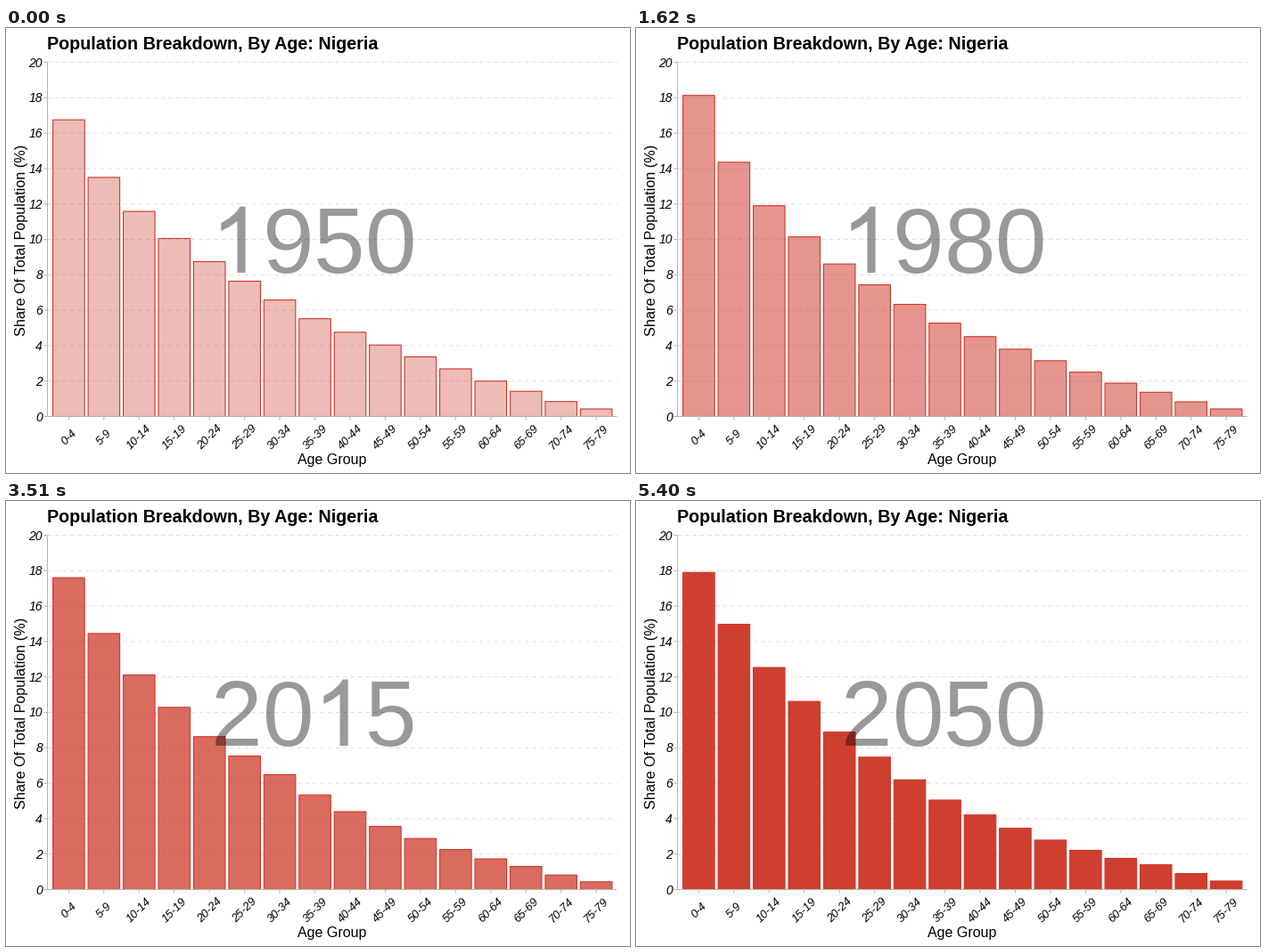
Recreate the animation shown at these times as a matplotlib script. Size 700x500 px, loop 5670 ms.

```python
import numpy as np
import matplotlib.pyplot as plt
from matplotlib.animation import FuncAnimation
from matplotlib.patches import Polygon, Rectangle

W, H, DPI = 700, 500, 100
LEFT, RIGHT, TOP, BASE = 46.5, 685.5, 38.5, 436.5
UNIT = (BASE - TOP) / 20              # pixels per percent
PITCH, FIRST = 39.45, 70.4            # bar spacing, first bar centre
BAR_W = 0.9 * PITCH
STEPS, GROUPS = 21, 16                # five years per step and per group
FILL, EDGE = (0.812, 0.247, 0.188), "#d0362a"
AXIS, GRID = "#b3b3b3", "#dfdfdf"
YEAR_X, YEAR_Y, YEAR_PX = 230, 275, 103.5
# Footless digit one, in em
ONE = [(0.373, 0), (0.285, 0), (0.285, 0.56), (0.20, 0.499), (0.109, 0.454),
       (0.109, 0.539), (0.20, 0.594), (0.275, 0.661), (0.316, 0.719),
       (0.373, 0.719)]


def shares(step):
    """Percent per age group: average profile x birth wave x slow tilts."""
    age = np.arange(GROUPS)
    profile = np.interp(age, [0, 1, 2, 4, 7, 10, 13, 15],
                        [4.175, 3.767, 3.471, 2.965,
                         2.285, 1.749, 1.162, 0.656]) ** 2
    # Bulges in births travel to the right as each cohort ages
    wave = np.interp(step - age, [2, 4, 6, 7, 9, 13, 20],
                     [0.961, 0.985, 1.04, 1.04, 0.983, 1.01, 1.027])
    early = np.interp(age, [0, 1, 3, 6, 11, 15],
                      [0, -0.01, 0.01, 0.085, 0.16, 0.03])
    late = np.interp(age, [0, 1, 10, 12, 15], [0, 0.03, -0.08, -0.06, 0.1])
    fade = 1 / (1 + (step / 6.5) ** 4)
    rise = (step / (STEPS - 1)) ** 1.5
    return profile * wave * (1 + early * fade + late * rise)


plt.rcParams["font.family"] = "Liberation Sans"
fig = plt.figure(figsize=(W / DPI, H / DPI), dpi=DPI, facecolor="white")
ax = fig.add_axes([0, 0, 1, 1])
ax.set_xlim(0, W)
ax.set_ylim(H, 0)
ax.axis("off")


def line(xs, ys, color, z, **kw):
    ax.plot(xs, ys, color=color, lw=0.72, zorder=z, snap=False,
            solid_capstyle="butt", **kw)


def label(x, y, text, px, **kw):
    return ax.text(x, y, text, fontsize=px * 72 / DPI, **kw)


for pct in range(0, 21, 2):
    y = BASE - pct * UNIT
    if pct:
        line([LEFT, RIGHT], [y, y], GRID, 1, dashes=(4.5, 4))
    line([LEFT - 4, LEFT], [y, y], AXIS, 4)
    label(41, y + 5, str(pct), 14, style="italic", ha="right", va="baseline")
line([LEFT, LEFT], [TOP, BASE], AXIS, 4)
line([LEFT, RIGHT], [BASE, BASE], AXIS, 4)

bars = []
for g in range(GROUPS):
    cx = FIRST + g * PITCH
    line([cx, cx], [BASE, BASE + 4], AXIS, 4)
    label(cx + 0.5, 460, f"{5 * g}-{5 * g + 4}", 13, style="italic",
          rotation=45, ha="center", va="center")
    bar = Rectangle((cx - BAR_W / 2, BASE), BAR_W, 0, lw=0.8, ec=EDGE,
                    joinstyle="round", snap=False, zorder=2)
    bars.append(ax.add_patch(bar))

label(46, 24, "Population Breakdown, By Age: Nigeria", 19.8, weight="bold")
label(366, 490, "Age Group", 16, ha="center", va="baseline")
label(22, 238.5, "Share Of Total Population (%)", 16.2, rotation=90,
      rotation_mode="anchor", ha="center", va="baseline")

# Each place of the year holds a text digit and a drawn one
digits, ones = [], []
for k in range(4):
    x = YEAR_X + k * 0.556 * YEAR_PX
    digits.append(label(x, YEAR_Y, "", YEAR_PX, alpha=0.4, zorder=5))
    outline = [(x + u * YEAR_PX, YEAR_Y - v * YEAR_PX) for u, v in ONE]
    ones.append(ax.add_patch(Polygon(outline, fc="black", ec="none",
                                     alpha=0.4, zorder=5)))


def draw(i):
    alpha = 0.35 + 0.65 * i / (STEPS - 1)
    for bar, share in zip(bars, shares(i)):
        bar.set_height(-share * UNIT)
        bar.set_facecolor((*FILL, alpha))
    for char, digit, one in zip(str(1950 + 5 * i), digits, ones):
        digit.set_text("" if char == "1" else char)
        one.set_visible(char == "1")
    return [*bars, *digits, *ones]


anim = FuncAnimation(fig, draw, frames=STEPS, init_func=lambda: draw(0),
                     interval=270, repeat=True, repeat_delay=0)
plt.show()
```
